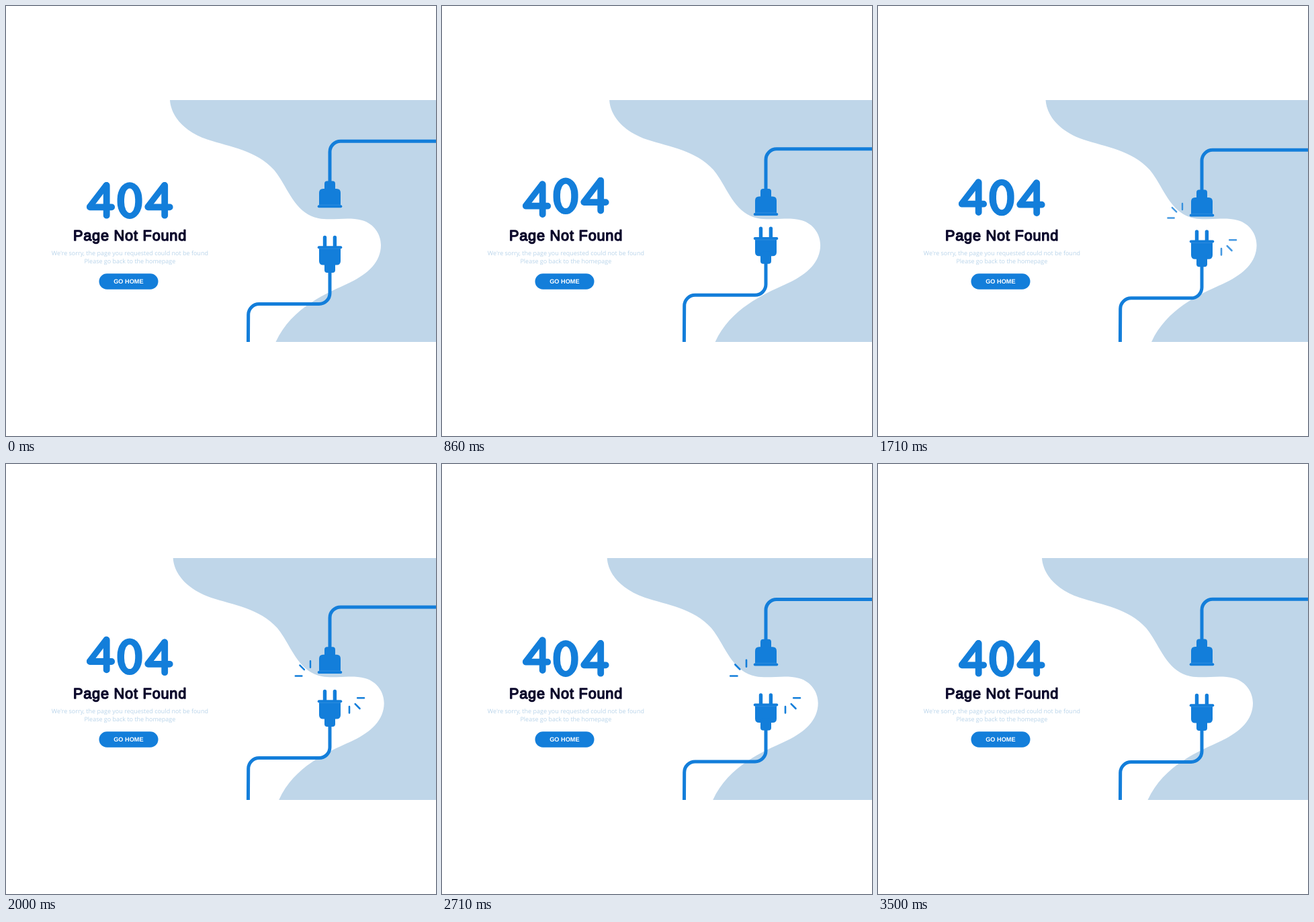
Animation of 640x640 px, one loop 3570 ms. Source, as an HTML page:

```html
<!DOCTYPE html>
<html lang="en">
<head>
<meta charset="utf-8">
<title>Page Not Found</title>
<style>
  html, body { margin: 0; width: 100%; height: 100%; overflow: hidden; background: #fff; }
  svg { display: block; width: 100%; height: 100%; }
  .solid { fill: #137eda; }
  .line { fill: none; stroke: #137eda; stroke-linecap: round; stroke-linejoin: round; }
  .cable { stroke-width: 5; }
  .spark { stroke-width: 2.6; }
  .seam { stroke: #4a9be3; stroke-width: .5; }
  text { text-anchor: middle; text-rendering: geometricPrecision; }
  .title { font: 21.8px "Liberation Sans", Arial, sans-serif; letter-spacing: .75px;
           fill: #09062a; stroke: #09062a; stroke-width: 1.3; stroke-linejoin: round; }
  .note { font: 9px "Open Sans", sans-serif; fill: #b9d4ea; }
  .label { font: bold 9.2px "Liberation Sans", Arial, sans-serif; fill: #fff; }
</style>
</head>
<body>
<svg viewBox="0 0 640 640">
  <defs>
    <clipPath id="band"><rect y="140" width="640" height="360"/></clipPath>
    <g id="four" class="line">
      <path stroke-width="9.8" d="M124.9 299.3H157.2M149.7 267V311.7"/>
      <path stroke-width="9" d="M124.6 298.6L149.2 266.6"/>
    </g>
  </defs>

  <g clip-path="url(#band)">
    <path id="blob" fill="#bfd6e9" d="M244 140C245 158 258 184 300 198.8C334 210 372 214.500 399 244
      C419 268 429 309 465 316C487 320 508 313 530 319C548 324 558 340 558 356
      C558 381 538 399 513 411C484 425 426 446 401.5 500H660V140Z"/>

    <g id="socket" class="solid">
      <path class="line cable" d="M650 201.2H498a16 16 0 0 0-16 16V265"/>
      <rect x="474" y="260.5" width="16" height="18" rx="4"/>
      <path d="M466 297V278q0-6 6-6h20q6 0 6 6v19z"/>
      <rect x="463.7" y="296.3" width="36.6" height="4" rx="2"/>
      <path class="seam" d="M466 296.2H498"/>
    </g>

    <g id="plug" class="solid">
      <path class="line cable" d="M482 392V427.5a16 16 0 0 1-16 16H376.7a16 16 0 0 0-16 16L360.3 530"/>
      <rect x="471.8" y="341.8" width="5.4" height="19" rx="2.7"/>
      <rect x="486.7" y="341.8" width="5.4" height="19" rx="2.7"/>
      <rect x="463.7" y="357.2" width="36.6" height="4" rx="2"/>
      <path d="M466 360.5H498V379.5q0 6-6 6H472q-6 0-6-6z"/>
      <path class="seam" d="M466 361.2H498"/>
      <rect x="474" y="379" width="16" height="18" rx="4"/>
    </g>
  </g>

  <g id="sparks" class="line spark">
    <path id="left" d="M453 291.7V301.8M436.3 298.5L443.3 305.5M429.2 315.5H439.5"/>
    <path d="M523.2 348.3H533M519.7 357.2L526.5 364M511 361V370.5"/>
  </g>

  <g role="img" aria-label="404">
    <use id="d0" href="#four"/>
    <g id="d1">
      <rect class="solid" x="165.6" y="262.3" width="37" height="54.6" rx="18.5" ry="25"/>
      <rect fill="#fff" x="176" y="271.5" width="16.2" height="36.4" rx="8.1" ry="16"/>
    </g>
    <use id="d2" href="#four" x="86.5"/>
  </g>

  <text class="title" x="184.5" y="349.4">Page Not Found</text>
  <text class="note" x="184.4" y="371.3">We're sorry, the page you requested could not be found</text>
  <text class="note" x="184.4" y="383.3">Please go back to the homepage</text>
  <rect class="solid" x="138.5" y="398.3" width="88" height="23.5" rx="11.75"/>
  <text class="label" x="182.4" y="413.1">GO HOME</text>
</svg>

<script>
const LOOP = 3570, STEP = LOOP / 50;
const el = id => document.getElementById(id);
const clamp = u => Math.min(1, Math.max(0, u));

// Eases out to `amount` by `peak`, rests until `back`, returns to zero by `end`.
// A power of 1 starts at full speed, 2 starts gently.
const swing = (amount, power, peak, back, end) => t => {
  const up = Math.sin(clamp(t / peak) * Math.PI / 2) ** power;
  const down = Math.cos(clamp((t - back) / (end - back)) * Math.PI / 2) ** 2;
  return amount * up * down;
};

const drift = swing(6.1, 1.2, 1290, 1290, 3500);
const lift = {
  socket: swing(13.1, 2, 1100, 1785, 2800),
  plug: swing(-13.2, 1, 860, 860, 3000),
  d0: swing(-5.7, 2, 2400, 2400, 3500),
  d1: swing(-6.8, 1, 860, 1070, 2750),
  d2: swing(-7.2, 1, 715, 1000, 2430)
};

function draw(now) {
  const t = Math.floor((now % LOOP + 4) / STEP) * STEP % LOOP;
  el("blob").setAttribute("transform", `translate(${drift(t)})`);
  for (const id in lift) el(id).setAttribute("transform", `translate(0 ${lift[id](t)})`);

  // Sparks fade in and out while the left ones spread slowly.
  el("sparks").setAttribute("opacity", clamp((t - 1430) / 360) * clamp((3290 - t) / 430));
  const spread = 1 + (t - 2710) / 10900;
  el("left").setAttribute("transform", `translate(453 315.5) scale(${spread}) translate(-453 -315.5)`);
}

const start = performance.now();
(function tick() {
  draw(performance.now() - start);
  requestAnimationFrame(tick);
})();
</script>
</body>
</html>
```
